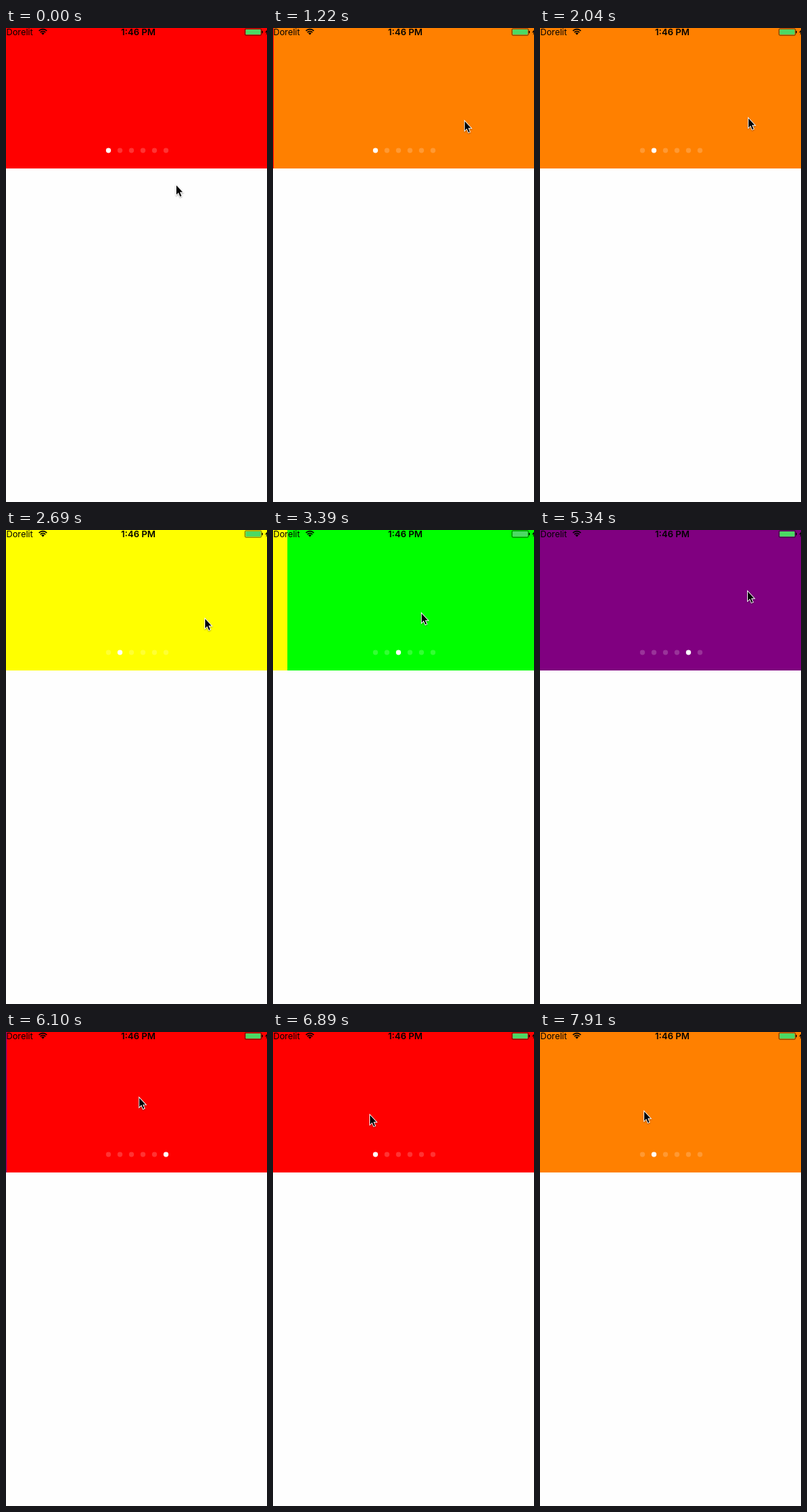
Animation of 363 by 658 pixels, one loop 8000 ms. Source, as an HTML page with a canvas:

```html
<!DOCTYPE html>
<html lang="en">
<head>
<meta charset="utf-8">
<title>Paged banner</title>
<style>
html, body { margin: 0; width: 100%; height: 100%; overflow: hidden; background: #fefefe; }
canvas { display: block; width: 363px; height: 658px; }
</style>
</head>
<body>
<canvas id="stage"></canvas>
<script>
const W = 363, H = 658, BANNER = 195, LOOP = 8000;
const SCROLL = 430, DOT_DELAY = 510, GLIDE = 220, PULL = 80;
const COLORS = ['#ff0000', '#ff8000', '#ffff00', '#00ff00', '#0000ff', '#800080'];
const HOME = { x: 236, y: 217 };

// Each move ends at rest in (x, y); a swipe also pulls left on the way and turns the page.
const glide = (at, x, y) => ({ at, x, y, time: GLIDE, pull: 0 });
const swipe = (at, x, y) => ({ at, x, y, time: SCROLL, pull: PULL });
const MOVES = [
  glide(160, 255, 141),
  swipe(800, 271, 128),
  glide(1810, 289, 124),
  swipe(2210, 276, 122),
  swipe(3100, 273, 112),
  swipe(3890, 252, 105),
  glide(4530, 262, 108),
  swipe(4890, 288, 84),
  swipe(5710, 205, 90),
  glide(6670, 134, 114),
  swipe(7190, 144, 109)
];
const SWIPES = MOVES.filter(m => m.pull);

const canvas = document.getElementById('stage');
const ctx = canvas.getContext('2d');
const dpr = window.devicePixelRatio || 1;
canvas.width = W * dpr;
canvas.height = H * dpr;

const progress = (t, start, time) => Math.max(0, Math.min(1, (t - start) / time));
const smooth = u => u * u * (3 - 2 * u);
const settle = u => 1 - Math.pow(1 - Math.pow(u, 1.2), 3);

function pointerAt(t) {
  let { x, y } = HOME;
  for (const m of MOVES) {
    const u = progress(t, m.at, m.time);
    x += (m.x - x) * smooth(u) - m.pull * Math.sin(Math.PI * u);
    y += (m.y - y) * smooth(u);
  }
  return [x, y];
}

function polygon(points) {
  ctx.beginPath();
  points.forEach(p => ctx.lineTo(p[0], p[1]));
  ctx.closePath();
}

function drawBanner(t) {
  const pos = SWIPES.reduce((sum, s) => sum + settle(progress(t, s.at, SCROLL)), 0);
  const page = Math.floor(pos);
  const shift = Math.floor((pos - page) * W);
  ctx.fillStyle = COLORS[page % 6];
  ctx.fillRect(0, 0, W, BANNER);
  ctx.fillStyle = COLORS[(page + 1) % 6];
  ctx.fillRect(W - shift, 0, shift, BANNER);
}

function drawDots(t) {
  const active = SWIPES.filter(s => t >= s.at + DOT_DELAY).length % 6;
  for (let i = 0; i < 6; i++) {
    ctx.fillStyle = i === active ? '#fff' : 'rgba(255,255,255,0.2)';
    ctx.beginPath();
    ctx.arc(142.5 + 16 * i, 170, 3.45, 0, Math.PI * 2);
    ctx.fill();
  }
}

function drawWifi(x, y) {
  const from = -Math.PI * 0.75, to = -Math.PI * 0.25;
  ctx.lineWidth = 1.7;
  for (const r of [7.8, 4.9]) {
    ctx.beginPath();
    ctx.arc(x, y, r, from, to);
    ctx.stroke();
  }
  ctx.beginPath();
  ctx.moveTo(x, y);
  ctx.arc(x, y, 3, from, to);
  ctx.fill();
}

function drawBattery(x, y) {
  ctx.fillStyle = '#4cd964';
  ctx.beginPath();
  ctx.roundRect(x + 1, y + 1, 21, 7.2, 0.8);
  ctx.fill();
  ctx.lineWidth = 0.6;
  ctx.beginPath();
  ctx.roundRect(x, y, 23, 9.2, 1.6);
  ctx.stroke();
  ctx.fillStyle = '#000';
  ctx.fillRect(x + 23.6, y + 3, 1.2, 3.2);
}

function drawStatus() {
  ctx.fillStyle = ctx.strokeStyle = '#000';
  ctx.textAlign = 'left';
  ctx.font = '12px Inter, Roboto, sans-serif';
  ctx.fillText('Dorelit', 0.5, 10);
  ctx.textAlign = 'center';
  ctx.font = '600 12.4px Inter, Roboto, sans-serif';
  ctx.fillText('1:46 PM', 184, 10);
  drawWifi(51.3, 9.5);
  drawBattery(332.3, 1);
  polygon([[364, 1.5], [360.2, 6.2], [362.6, 6.2], [361.6, 10], [365, 5]]);
  ctx.fill();
}

function drawPointer(x, y) {
  ctx.save();
  ctx.translate(x, y);
  polygon([[1, 1.6], [1, 14.2], [3.9, 11.4], [6.2, 16.9], [8, 16.1], [5.7, 10.8], [9.6, 10.8]]);
  ctx.lineWidth = 1.8;
  ctx.strokeStyle = '#fff';
  ctx.shadowColor = 'rgba(0,0,0,0.35)';
  ctx.shadowBlur = 2 * dpr;
  ctx.shadowOffsetY = dpr;
  ctx.stroke();
  ctx.shadowColor = 'transparent';
  ctx.fillStyle = '#000';
  ctx.fill();
  ctx.restore();
}

function frame(now) {
  const t = now % LOOP;
  ctx.setTransform(dpr, 0, 0, dpr, 0, 0);
  ctx.fillStyle = '#fefefe';
  ctx.fillRect(0, 0, W, H);
  drawBanner(t);
  drawDots(t);
  drawStatus();
  drawPointer(...pointerAt(t));
  requestAnimationFrame(frame);
}
requestAnimationFrame(frame);
</script>
</body>
</html>
```
